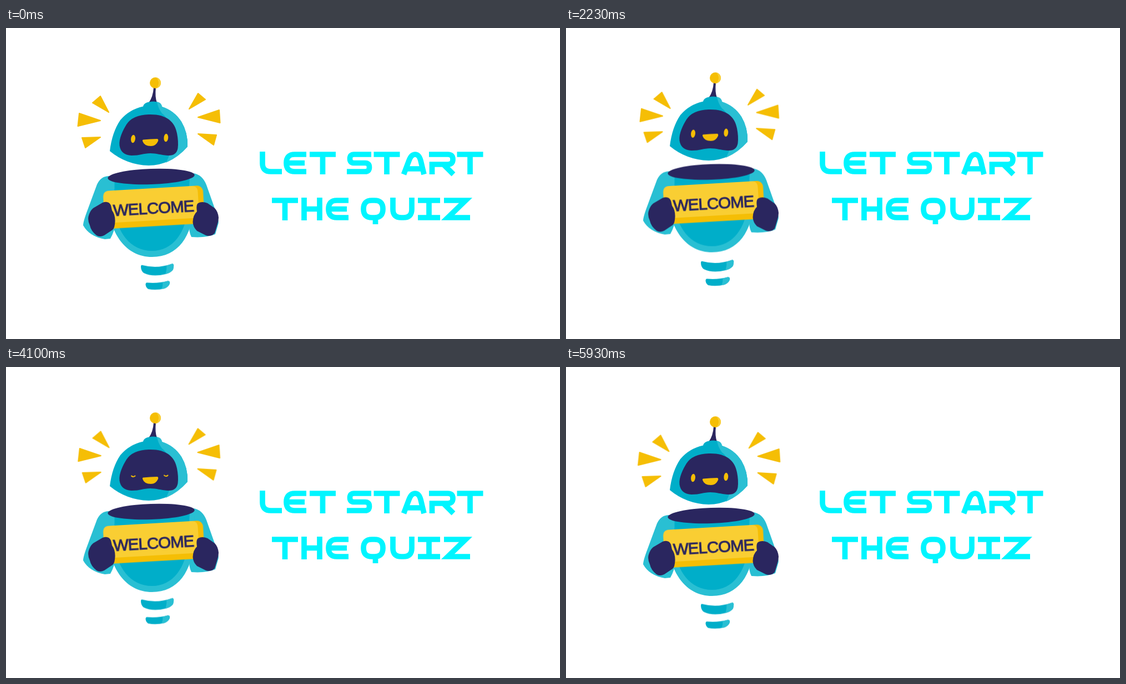
Write an HTML page that moves like this. It is 998x561 px and loops after 6010 ms.

```html
<!DOCTYPE html>
<html lang="en">
<head>
<meta charset="utf-8">
<title>Let start the quiz</title>
<style>
  html, body { margin: 0; width: 100%; height: 100%; overflow: hidden; background: #fff; }
  svg { display: block; width: 100vw; height: 100vh; }

  .teal { fill: #00aec9; }
  .light { fill: #29bfd3; }
  .navy { fill: #2a265f; }
  .gold { fill: #f5be05; }
  .sun { fill: #f9ce33; }
  .title path { fill: none; stroke: #00f5ff; stroke-width: 9.7; }
  .sign text {
    font: 29.5px "Liberation Sans", Arial, sans-serif; letter-spacing: -1px; text-anchor: middle;
    stroke: #2a265f; stroke-width: 1; stroke-linejoin: round;
  }

  .bob, .tail { animation: bob 3005ms cubic-bezier(.37, 0, .63, 1) infinite alternate; }
  .tail { animation-delay: -5710ms; }
  .sparks path { animation: pulse 500.833ms cubic-bezier(.37, 0, .63, 1) infinite alternate; }
  .head, .face, .arm, .hand, .sign { animation: 6010ms cubic-bezier(.37, 0, .63, 1) infinite; }
  .head { animation-name: head; }
  .face { animation-name: face; }
  .arm { animation-name: arm; }
  .hand { animation-name: hand; transform-box: fill-box; transform-origin: center; }
  .sign { animation-name: sign; }
  .open { animation: open 6010ms step-end infinite; }
  .shut { animation: shut 6010ms step-end infinite; }
  .l { --d: 1; }
  .r { --d: -1; }
  .arm.l { transform-origin: 182px 275px; }
  .arm.r { transform-origin: 343px 270px; }

  @keyframes bob { to { transform: translateY(-10px); } }
  @keyframes pulse { to { transform: translate(var(--x), var(--y)); } }
  @keyframes head {
    0%, 38.3%, 43.8%, 61.6%, 100% { transform: none; }
    16.6%, 31.6% { transform: translateY(-6.5px); }
    53.2%, 53.7% { transform: translateY(-9.1px); }
    55.4% { transform: translateY(-5px); }
  }
  @keyframes face {
    0%, 5%, 37.9%, 53.7%, 74.9%, 100% { transform: none; }
    13.3%, 32.1% { transform: translateY(-8.6px); }
    55.4% { transform: translateY(1.3px); }
    66.6%, 69.9% { transform: translateY(5px); }
  }
  @keyframes arm {
    0%, 5%, 36.3%, 53.7%, 64.6%, 78.2%, 94.8%, 100% { transform: rotate(0deg); }
    13.3%, 32.1% { transform: rotate(calc(var(--d) * 15.8deg)); }
    55.4% { transform: rotate(calc(var(--d) * 5deg)); }
    58.2%, 59.9% { transform: rotate(calc(var(--d) * 14.5deg)); }
    84.9%, 88.2% { transform: rotate(calc(var(--d) * 7.4deg)); }
  }
  @keyframes hand {
    0%, 5%, 36.3%, 53.7%, 64.6%, 78.2%, 94.8%, 100% { transform: translate(0px, 0px) rotate(0deg); }
    13.3%, 32.1% { transform: translate(calc(var(--d) * -9.8px), -10.2px) rotate(calc(var(--d) * 15deg)); }
    55.4% { transform: translate(calc(var(--d) * -4.5px), -9.7px) rotate(calc(var(--d) * 5deg)); }
    58.2%, 59.9% { transform: translate(calc(var(--d) * -9px), -12px) rotate(calc(var(--d) * 14deg)); }
    84.9%, 88.2% { transform: translate(calc(var(--d) * -4px), calc(8.5px + var(--d) * 2px)) rotate(calc(var(--d) * 7deg)); }
  }
  @keyframes sign {
    0%, 5%, 36.3%, 53.7%, 64.6%, 78.2%, 94.8%, 100% { transform: none; }
    13.3%, 32.1% { transform: translateY(-13.8px); }
    55.4% { transform: translateY(-5px); }
    58.2%, 59.9% { transform: translateY(-12.5px); }
    84.9%, 88.2% { transform: translateY(14.6px); }
  }
  @keyframes open { 0%, 69.9% { opacity: 1; } 66.8% { opacity: 0; } }
  @keyframes shut { 0%, 69.9% { opacity: 0; } 66.8% { opacity: 1; } }
</style>
</head>
<body>
<svg viewBox="0 0 998 561" preserveAspectRatio="none">
  <g class="tail">
    <path class="teal" d="M246 428Q272 435 299 425.5Q303 425 302 431L301 436Q298 441 288 444Q264 450 248 442Q243 438 243 431Q243 427 246 428Z"/>
    <path class="light" d="M289 429L299 425.5Q303 425 302 431L301 436Q298 441 287 444.3Q290 436 289 429Z"/>
    <path class="teal" d="M254 459.5Q275 461 291 456.5Q296 456 295 461Q293 467 286 470Q270 474 256 471Q251 467 251.5 462Q252 459 254 459.5Z"/>
    <path class="light" d="M282 459L291 456.5Q296 456 295 461Q293 467 286 470L280 471.3Q283 465 282 459Z"/>
  </g>

  <g class="bob">
    <path class="arm l light" d="M186 267Q171 267 164 282L147 328Q139 349 139 356Q150 376 178 381L188 380Q196 366 197 350L200 270Z"/>
    <path class="arm r light" d="M338 262Q354 265 361 283L378 331Q384 349 382.5 353L377 372Q360 379 334 377Q329 368 330 350L328 270Z"/>
    <path class="light" d="M184 268V320C188 370 215 413 263 413C310 413 336 375 338 320L339.5 266Z"/>
    <path class="teal" d="M195.5 270V320C198 370 225 402 263 402C300 402 325 370 328 320L331 270Z"/>
    <path class="gold" stroke="#2a265f" stroke-width="3" d="M310 294L326 293L327 306L311 307Z"/>
    <ellipse class="navy" cx="261.5" cy="268" rx="78.2" ry="14" transform="rotate(-2 261.5 268)"/>

    <g class="sign">
      <g transform="rotate(-3.3 266 323)">
        <rect class="gold" x="176.5" y="289" width="180" height="68.5" rx="11"/>
        <path class="sun" d="M187.5 289H336Q347 289 347 300V336Q347 347 336 347H176.5V300Q176.5 289 187.5 289Z"/>
        <text class="navy" x="265.5" y="334.5">WELCOME</text>
      </g>
    </g>
    <path class="hand l navy" d="M174 315Q185 311 189 320L191 329Q197 337 196.5 349Q196 361 192 364L177 374Q169 378 163 374Q153 366 151 356Q147 348 148.5 340Q151 330 157 325Z"/>
    <path class="hand r navy" d="M346 316Q353 312 363 316L376 325Q382 331 383 342Q383 349 380 357L376 370Q370 377 360 374L344 366Q337 359 336.5 350Q337 337 344 331Q342 319 346 316Z"/>

    <g class="head">
      <g class="sparks gold" stroke="#f5be05" stroke-width="2" stroke-linejoin="round">
        <path style="--x:6px;--y:4.6px" d="M170 123L156 135L185 152Z"/>
        <path style="--x:9.3px;--y:1.5px" d="M132 154L129.5 177L170 167Z"/>
        <path style="--x:8.3px;--y:-1.8px" d="M137 198L143 216L170 197Z"/>
        <path style="--x:-4.6px;--y:3.8px" d="M346 118L359 129L330 146Z"/>
        <path style="--x:-5.8px;--y:1px" d="M384 148L385.5 171L346 161Z"/>
        <path style="--x:-6.6px;--y:-2px" d="M346 191L379 193L374 211Z"/>
      </g>
      <path class="navy" d="M266 107H270Q268 124 272 135H257Q265 124 266 107Z"/>
      <circle class="gold" cx="269" cy="99" r="10"/>
      <path class="sun" d="M271 89.2A10 10 0 0 1 271 108.8Q279 99 271 89.2Z"/>

      <path class="teal" d="M187 222Q191 188 206 166Q222 147 247 141.5Q248 136 255 134Q265 131 275 134Q280 136 281 142Q303 149 316 169Q328 189 327 214Q296 248 257 248Q217 247 187 222Z"/>
      <path class="light" d="M272 133.3Q280 135 281 142Q303 149 316 169Q328 189 327 214Q311 233 288 243Q300 222 300 190Q294 164 281 154Q274 145 272 133.3Z"/>
      <path class="navy" d="M257 156C288 155 304 168 308 190Q311 205 309.5 217Q307 231 291 230C278 229 272 226 260 226C247 226 242 230 226 230Q207 229 204.5 212C203 199 211 184 217 174Q228 157 257 156Z"/>

      <g class="face gold">
        <g class="open">
          <ellipse cx="229" cy="200" rx="3.9" ry="7.2" transform="rotate(7 229 200)"/>
          <ellipse cx="288.3" cy="198" rx="3.9" ry="7.2" transform="rotate(4 288 198)"/>
        </g>
        <path class="shut" fill="none" stroke="#f5be05" stroke-width="2" stroke-linecap="round" d="M226 198.5Q229 201.5 232.5 198.5M285 197.5Q288.5 200.5 291.5 197.5"/>
        <path d="M247 201.5Q260 200 272 200Q275 200 274 204Q270 213 261 213Q249 213 246 204Q245.5 201.6 247 201.5Z"/>
      </g>
    </g>
  </g>

  <g class="title" role="img" aria-label="LET START THE QUIZ">
    <path d="M462 223V244Q462 259 477 259H497"/>
    <path id="e" d="M541 228H520Q505 228 505 243.5Q505 259 520 259H541M505 243.5H538"/>
    <path id="t" d="M547 228H594M570.5 228V264"/>
    <path d="M658 228H627Q619.5 228 619.5 235.7Q619.5 243.5 627 243.5H647Q654.5 243.5 654.5 251.2Q654.5 259 647 259H614"/>
    <use href="#t" x="115.5"/>
    <path d="M716.5 264L726 239Q730 228 737 228Q744 228 747 239L753 264M722 254H750"/>
    <path d="M762 228H796Q805 228 805 237Q805 246 796 246H767.5V264M788 246L806 264"/>
    <use href="#t" x="265.5"/>

    <use href="#t" x="-68" y="83"/>
    <path d="M537 306V347M565 306V347M537 326.5H565"/>
    <use href="#e" x="76" y="83"/>
    <path d="M659 311H664Q679 311 679 326.5Q679 342 664 342H659Q644 342 644 326.5Q644 311 659 311ZM665.5 338V354"/>
    <path d="M697 306V327Q697 342 712 342H716Q731 342 731 327V306"/>
    <path d="M742 311H782M742 342H782M762 311V342"/>
    <path d="M789 311H828L796 342H836"/>
  </g>
</svg>
</body>
</html>
```
